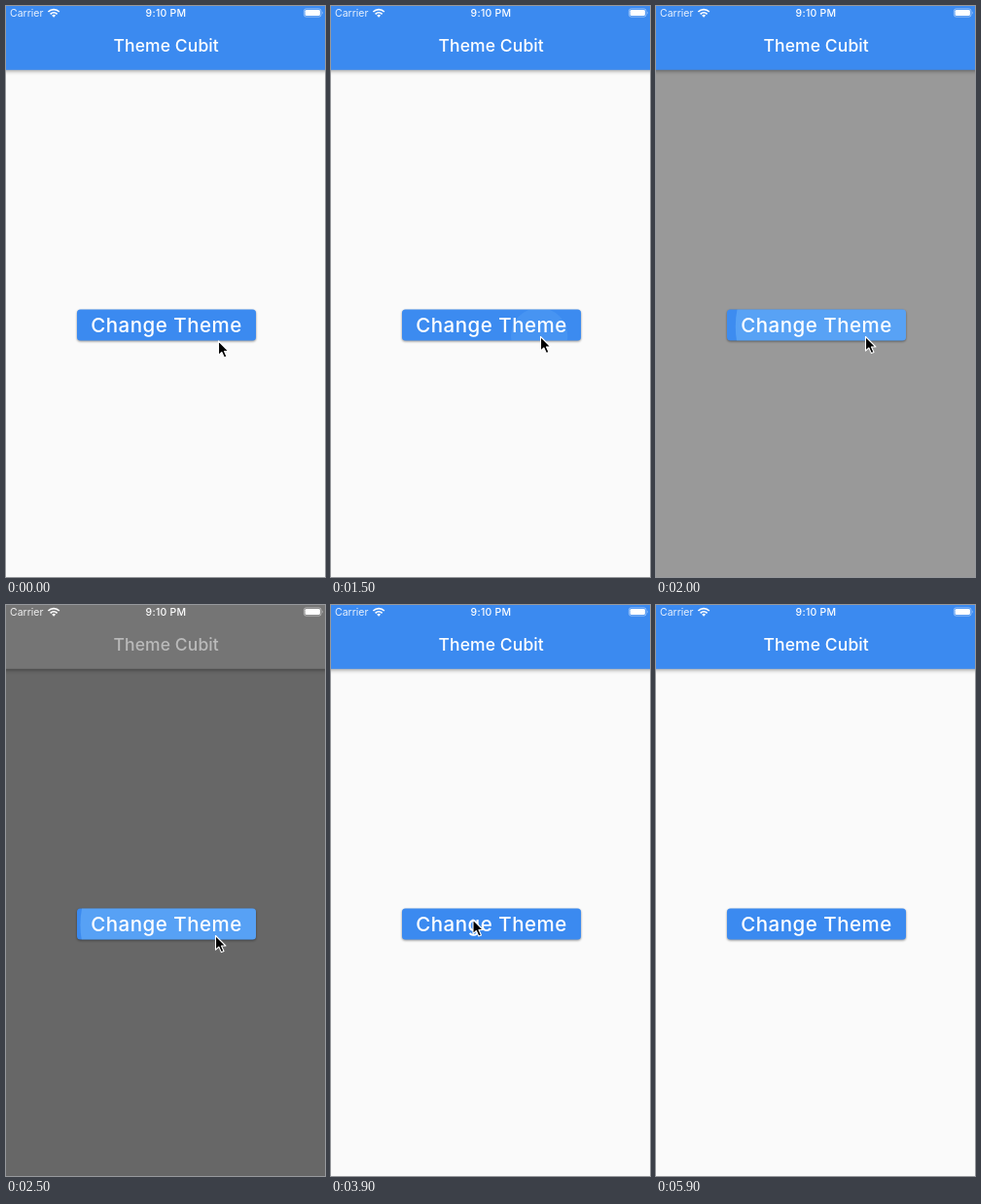
Write an HTML page that moves like this. It is 328 by 588 pixels and loops after 6400 ms.

```html
<!DOCTYPE html>
<html lang="en">
<head>
<meta charset="utf-8">
<title>Theme switch</title>
<style>
  html, body { margin: 0; width: 100%; height: 100%; overflow: hidden; background: #fafafa; }
  svg { display: block; width: 328px; height: 588px; }
  text { font-family: Inter, Roboto, sans-serif; fill: #fff; }
  #bar { filter: drop-shadow(0 1.5px 2px rgba(0, 0, 0, .42)); }
  .status { font-size: 10.5px; }
  .title { font-size: 17.5px; font-weight: 500; letter-spacing: .1px; }
  .label { font-size: 20.5px; font-weight: 500; letter-spacing: .5px; }
</style>
</head>
<body>
<svg viewBox="0 0 328 588">
  <defs>
    <clipPath id="clip"><rect x="73" y="312.5" width="184" height="32" rx="3.5"/></clipPath>
  </defs>
  <rect id="page" width="328" height="588"/>
  <rect id="bar" x="-8" y="-8" width="344" height="73.8"/>

  <text class="status" x="4" y="11" opacity=".88">Carrier</text>
  <g fill="none" stroke="#fff" stroke-width="1.7">
    <path d="M43.4 6 a8.1 8.1 0 0 1 11.4 0"/>
    <path d="M45.6 8.3 a5 5 0 0 1 7 0"/>
    <path d="M47.2 9.7 a2.7 2.7 0 0 1 3.8 0 L49.1 11.7 Z" fill="#fff" stroke="none"/>
  </g>
  <text class="status" x="164.5" y="11" text-anchor="middle" font-weight="500" letter-spacing=".25">9:10 PM</text>
  <rect x="306.4" y="2.9" width="17.6" height="8.2" rx="2.2" fill="none" stroke="#fff" stroke-width=".8" opacity=".55"/>
  <rect x="307.5" y="4" width="15.4" height="6" rx="1.3" fill="#fff"/>
  <path d="M325 5.6 q1.4 1.4 0 2.8z" fill="#fff" opacity=".6"/>

  <text id="title" class="title" x="164.7" y="47" text-anchor="middle">Theme Cubit</text>

  <rect id="button" x="73" y="312.5" width="184" height="32" rx="3.5" fill="#3b8af0"/>
  <g clip-path="url(#clip)" fill="#8ccdff">
    <rect id="glow" x="73" y="312" width="184" height="33"/>
    <g id="ripples"></g>
  </g>
  <text class="label" x="165" y="335.8" text-anchor="middle">Change Theme</text>

  <path id="cursor" d="M0 0 V14.6 L3.4 11.5 L5.9 17.1 L8.5 16 L6 10.5 H10.4 Z"
        fill="#000" stroke="#fff" stroke-width="1.1" stroke-linejoin="round"/>
</svg>
<script>
const LOOP = 6400, STEP = 100;
const BLUE = '#3b8af0';
const CENTER = { x: 165, y: 328.5 };
const R_START = 28, R_END = 97.8;

// Each tap toggles the theme on release; a cancelled press does not.
const taps = [
  { down: 500, up: 620, x: 215, y: 340 },
  { down: 980, up: 1080, x: 215, y: 340 },
  { down: 1470, up: 1570, x: 215, y: 340 },
  { down: 1768, up: 1896, x: 215, y: 340 },
  { down: 2340, up: 2354, x: 215, y: 340 },
  { down: 3357, up: 3463, x: 146, y: 324 },
  { down: 4263, up: 4900, x: 146, y: 324, cancelled: true }
];

// time, x, y
const path = [
  [0, 218.5, 345], [200, 215.5, 340.5], [2600, 215.5, 340.5],
  [3200, 146, 324], [4800, 146, 324], [5300, 287, 421]
];
const CURSOR_END = 5400;

const $ = id => document.getElementById(id);
const clamp = v => Math.min(1, Math.max(0, v));
const mix = (a, b, k) => a + (b - a) * k;
const gray = v => { const n = Math.round(v); return `rgb(${n},${n},${n})`; };
const smooth = k => k * k * (3 - 2 * k);
const set = (el, attrs) => {
  for (const name in attrs) el.setAttribute(name, attrs[name]);
};

// cubic-bezier(.25, .1, .25, 1)
function ease(x) {
  const bez = (a, b, s) => 3 * a * s * (1 - s) ** 2 + 3 * b * s * s * (1 - s) + s ** 3;
  let lo = 0, hi = 1;
  for (let i = 0; i < 24; i++) {
    const mid = (lo + hi) / 2;
    if (bez(.25, .25, mid) < x) lo = mid; else hi = mid;
  }
  return bez(.1, 1, lo);
}

for (const tap of taps) {
  tap.el = document.createElementNS('http://www.w3.org/2000/svg', 'circle');
  $('ripples').append(tap.el);
}

function darkness(t) {
  return taps.filter(tap => !tap.cancelled)
    .reduce((d, tap, i) => d + (i % 2 ? -1 : 1) * clamp((t - tap.up) / 200), 0);
}

function drawRipple(tap, t) {
  const held = Math.max(0, Math.min(t, tap.up) - tap.down);
  const after = Math.max(0, t - tap.up);
  const p = ease(clamp(held / 1000 + after / 225));
  const fadeIn = after ? 1 : clamp(held / 75);
  const fadeOut = tap.cancelled ? clamp(after / 75) : clamp((after - 225) / 150);
  set(tap.el, {
    cx: mix(tap.x, CENTER.x, p),
    cy: mix(tap.y, CENTER.y, p),
    r: mix(R_START, R_END, p),
    opacity: .34 * fadeIn * (1 - fadeOut)
  });
  return clamp(held / 400) * (1 - clamp(after / 200));
}

function drawCursor(t) {
  let i = 0;
  while (i < path.length - 2 && t >= path[i + 1][0]) i++;
  const [t0, x0, y0] = path[i], [t1, x1, y1] = path[i + 1];
  const k = smooth(clamp((t - t0) / (t1 - t0)));
  set($('cursor'), {
    transform: `translate(${mix(x0, x1, k)} ${mix(y0, y1, k)})`,
    visibility: t < CURSOR_END ? 'visible' : 'hidden'
  });
}

function draw(t) {
  const d = darkness(t), dark = d > .5;
  set($('page'), { fill: gray(mix(250, 48, d)) });
  set($('bar'), { fill: dark ? gray(mix(255, 66, d)) : BLUE });
  $('title').style.fill = dark ? gray(255 * d) : '#fff';

  const press = Math.max(...taps.map(tap => drawRipple(tap, t)));
  set($('glow'), { opacity: .17 * press });
  $('button').style.filter =
    `drop-shadow(0 ${1.2 + press}px ${1.1 + press}px rgba(0,0,0,.42))`;
  drawCursor(t);
}

function tick() {
  const t = performance.now() % LOOP;
  draw(Math.floor(t / STEP) * STEP);
  requestAnimationFrame(tick);
}
tick();
</script>
</body>
</html>
```
